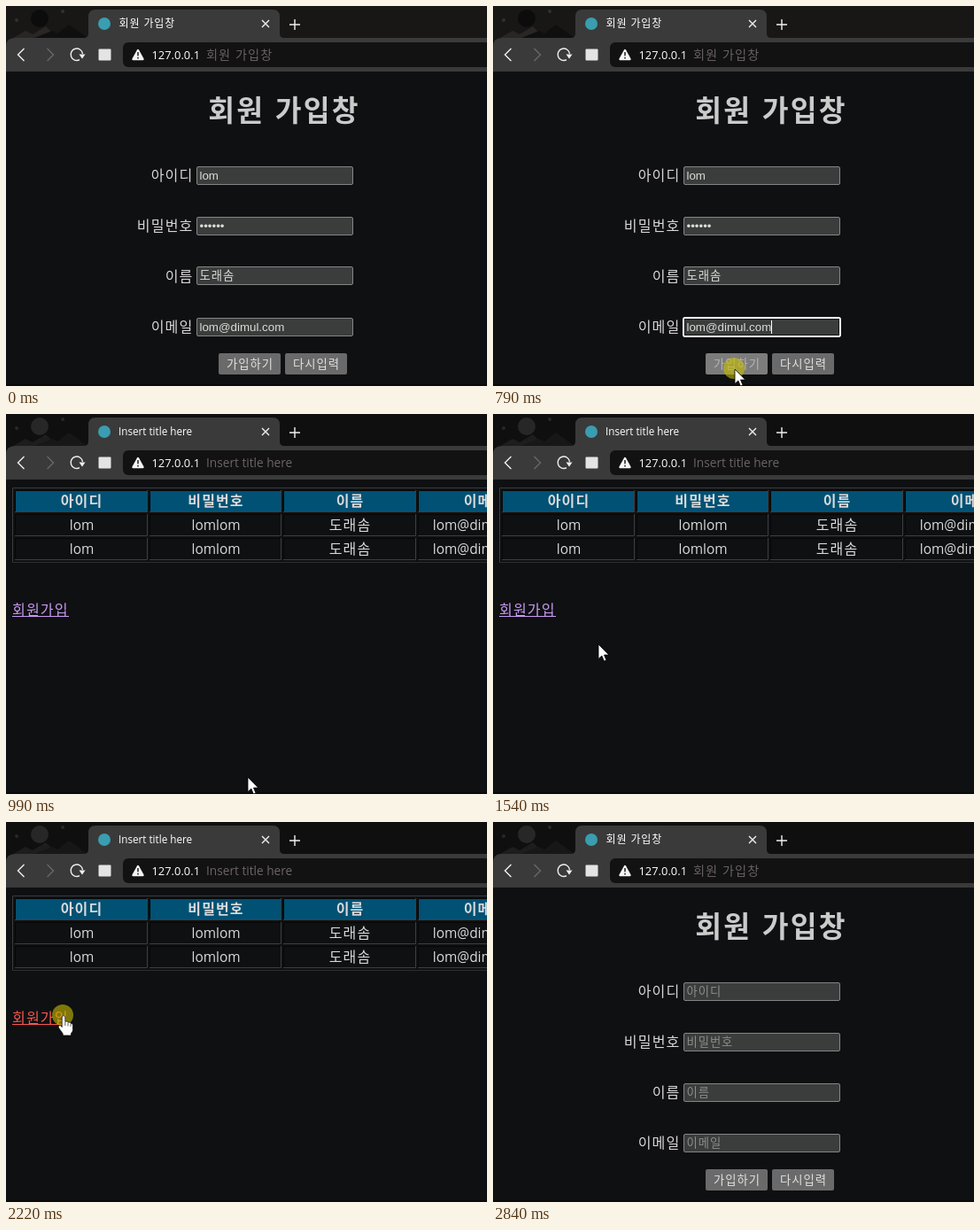
An HTML page that plays this animation: 543x429 px, repeating every 3240 ms.

```html
<!DOCTYPE html>
<html lang="ko">
<head>
<meta charset="utf-8">
<title>회원 가입창</title>
<style>
html, body { margin: 0; width: 100%; height: 100%; overflow: hidden; background: #0f1012; }
svg { display: block; width: 100vw; height: 100vh; }
text { font-family: "Noto Sans CJK KR", "Noto Sans CJK", sans-serif; letter-spacing: .07em; white-space: pre; }
.latin { font-family: "Open Sans", sans-serif; letter-spacing: 0; }
.field { font-family: "Liberation Sans", sans-serif; letter-spacing: 0; }
.line { fill: none; stroke: #f0f0f0; stroke-width: 1.4; }
</style>
</head>
<body>
<svg id="stage" viewBox="0 0 543 429" preserveAspectRatio="none">
  <rect width="543" height="429" fill="#0f1012"/>
  <rect id="strip" width="543" height="48"/>
  <g id="art"></g>
  <path d="M0 74V46Q0 36 10 36H88Q93 36 93 31V12Q93 4 101 4H301Q309 4 309 12V31Q309 36 314 36H543V74Z" fill="#3a3a3a"/>
  <circle cx="111" cy="20" r="7" fill="#3a9db0"/>
  <path class="line" d="M289 16l8 8m0-8l-8 8M320 21h12m-6-6v12" stroke-width="1.5"/>
  <path class="line" d="M20.500 48l-7 7 7 7"/>
  <path class="line" d="M46.500 48l7 7-7 7" style="stroke:#686868"/>
  <path class="line" d="M83 60.700A6.700 6.700 0 1 1 86.500 54"/>
  <path d="M82.500 54.500h7l-3.500 5z" fill="#f0f0f0"/>
  <rect x="104.500" y="48.500" width="14" height="13" rx="1" fill="#e4e4e4"/>
  <rect x="132" y="41" width="430" height="28" rx="6" fill="#121212"/>
  <path d="M149 50l5.500 10h-11z" fill="#f4f4f4" stroke="#f4f4f4" stroke-width="2.400" stroke-linejoin="round"/>
  <path d="M149 52v4.300m0 1.500v1.700" stroke="#121212" stroke-width="1.400"/>
  <text class="latin" x="164.500" y="60" font-size="12.900" fill="#fff">127.0.0.1</text>
  <g id="formTitle">
    <text x="127.500" y="24" font-size="12" fill="#fff">회원 가입창</text>
    <text x="226" y="60" font-size="14.200" fill="#686164">회원 가입창</text>
  </g>
  <g id="listTitle">
    <text class="latin" x="127" y="24" font-size="11.700" fill="#fff">Insert title here</text>
    <text class="latin" x="226" y="60" font-size="13.700" fill="#6c6468">Insert title here</text>
  </g>
  <g id="form"></g>
  <g id="list"></g>
  <rect y="427" width="543" height="2" fill="#0a0a0c"/>
  <circle id="halo" r="12" fill="#c8be00" fill-opacity=".6"/>
  <path id="arrow" d="M0 0V16.500L3.800 13L6.400 19L9 17.900L6.500 12H11.800Z" fill="#fff" stroke="#000" stroke-width=".8"/>
  <g id="hand" fill="#fff">
    <path d="M-1.800 1.300Q0 -1.300 1.800 1.300V7Q4 5.700 5 7.700Q7.300 6.800 8 8.800Q10.500 8.500 10.500 11V16Q10.500 18 8.500 20V22.500H-.800V20.500L-5.800 13.500Q-6.300 10.500 -3.800 11L-1.800 13Z" stroke="#000" stroke-width=".7"/>
    <path d="M1.800 7.500v4M5 8.500v3.500M8 9.500v3" stroke="#222" stroke-width=".7"/>
  </g>
</svg>
<script>
const LOOP = 3240;
const $ = id => document.getElementById(id);
const show = (id, on) => $(id).setAttribute('visibility', on ? 'visible' : 'hidden');
const paint = (id, color) => $(id).setAttribute('fill', color);

const text = (str, x, y, size, fill, extra = '') =>
  `<text x="${x}" y="${y}" font-size="${size}" fill="${fill}" ${extra}>${str}</text>`;
const rect = (x, y, w, h, fill, extra = '') =>
  `<rect x="${x}" y="${y}" width="${w}" height="${h}" fill="${fill}" ${extra}/>`;
const mid = 'text-anchor="middle"';
const hangul = str => /[가-힣]/.test(str);

// window theme
$('art').innerHTML = `
  <path id="hillBack" d="M8 36L22 28L30 32L45 23L58 36Z"/>
  <path id="hillFront" d="M32 36L52 28L58 31L71 21L92 36Z"/>
  <circle id="badge" cx="38" cy="14" r="10"/>
  <g id="dots"><circle cx="12" cy="16" r="2"/><circle cx="64" cy="6" r="2"/></g>`;

// sign-up form
const rows = [
  ['아이디', 181, 'lom'],
  ['비밀번호', 238, '••••••'],
  ['이름', 295, '도래솜'],
  ['이메일', 352, 'lom@dimul.com']
];

const box = y => rect(215.5, y + .5, 176, 20, '#3b3c3c', 'rx="1.5" stroke="#858585"');

const filled = rows.map(([, y, value]) => {
  const top = hangul(value) ? y - 1 : y;
  return box(top) + text(value, 218.5, top + 15, 13.33, '#dcdcd8', hangul(value) ? '' : 'class="field"');
}).join('');

const empty = rows.map(([label, y]) =>
  box(y) + text(label, 218.5, y + 14.5, 13.33, '#8c8c8c')).join('');

const button = (id, label, x) =>
  rect(x, 392, 70, 24, '#6a6a6a', `id="${id}" rx="2"`) +
  text(label, x + 35.5, 409, 13.33, '#e0e0e0', mid + ` id="${id}Text"`);

$('form').innerHTML =
  text('회원 가입창', 314, 130, 32.4, '#cbcbcb', mid + ' font-weight="700"') +
  rows.map(([label, y]) => text(label, 211.5, y + 16, 16.1, '#dad6d8', 'text-anchor="end"')).join('') +
  `<g id="filled">${filled}</g><g id="empty">${empty}</g>
   <g id="focus">
     <rect x="215" y="352" width="177" height="21" rx="2" fill="none" stroke="#fff" stroke-width="2"/>
     <rect x="216.500" y="353.500" width="174" height="18" fill="none" stroke="#151515"/>
     <path d="M314.500 355v15" stroke="#fff"/>
   </g>` +
  button('join', '가입하기', 240) + button('reset', '다시입력', 315);

// member list
const cols = [10, 162, 313, 465, 617];
const heads = ['아이디', '비밀번호', '이름', '이메일'];
const member = ['lom', 'lomlom', '도래솜', 'lom@dimul.com'];

function cell(str, col, row) {
  const x = cols[col], y = 86 + row * 27, w = cols[col + 1] - x - 2, h = 25;
  const [size, style] = hangul(str) ? [16, ''] : [15.4, 'class="latin"'];
  const weight = row ? 400 : 700;
  return rect(x, y, w, h, row ? '#0f1012' : '#005174') +
    `<path d="M${x + .5} ${y + h}V${y + .5}H${x + w}" fill="none" stroke="#050607"/>
     <path d="M${x} ${y + h - .5}H${x + w - .5}V${y}" fill="none" stroke="#3c3e41"/>` +
    text(str, x + w / 2 + .5, y + 18, size, '#dadada', `${mid} ${style} font-weight="${weight}"`);
}

$('list').innerHTML =
  '<path d="M7.500 168V83.500H543" fill="none" stroke="#393b3e"/><path d="M7 167.500H543" stroke="#2c2e30"/>' +
  [heads, member, member].map((r, i) => r.map((s, j) => cell(s, j, i)).join('')).join('') +
  `<g id="link"><text x="7" y="226.500" font-size="16.100">회원가입</text>
   <rect x="7" y="228" width="64" height="1"/></g>`;

// [start, shape, x, y]
const pointer = [
  [0, '', 0, 0],
  [70, 'arrow', 312, 392],
  [270, 'arrow', 298, 398],
  [365, 'arrow', 281, 407],
  [460, 'arrow', 273, 410],
  [1540, 'arrow', 119, 260],
  [1610, 'arrow', 97, 243],
  [1680, 'arrow', 83, 233],
  [1750, 'arrow', 74, 226],
  [1820, 'hand', 67, 220],
  [1890, 'hand', 65, 218.5],
  [2640, 'arrow', 195, 312],
  [2740, 'arrow', 310, 405],
  [2840, '', 0, 0]
];

function draw(t) {
  const within = (a, b) => t >= a && t < b;
  const list = within(990, 2360);
  const first = t < 990;

  show('form', !list);
  show('formTitle', !list);
  show('list', list);
  show('listTitle', list);
  // nested groups need their own state, since they override the parent
  show('filled', first);
  show('empty', t >= 2360);
  show('focus', within(70, 990));

  paint('strip', first ? '#191716' : '#0f0f10');
  paint('hillBack', first ? '#292625' : '#1d1d1e');
  paint('hillFront', first ? '#100f0f' : '#171718');
  paint('badge', first ? '#0d0c0c' : '#272728');
  paint('dots', first ? '#34302f' : '#29292a');

  const press = within(790, 920);
  paint('join', press ? '#7c7c7c' : within(365, 990) ? '#747474' : '#6a6a6a');
  paint('joinText', press ? '#b4b4b4' : '#e0e0e0');

  const tap = within(2220, 2360);
  paint('link', tap ? '#fb564d' : '#cb9af4');
  show('halo', press || tap);
  $('halo').setAttribute('transform', tap ? 'translate(64 218)' : 'translate(272 409)');

  const [, shape, x, y] = pointer.filter(p => p[0] <= t).pop();
  for (const id of ['arrow', 'hand']) {
    show(id, id === shape);
    $(id).setAttribute('transform', `translate(${x} ${y})`);
  }
}

const begin = performance.now();
function tick() {
  draw((performance.now() - begin) % LOOP);
  requestAnimationFrame(tick);
}
tick();
</script>
</body>
</html>
```
